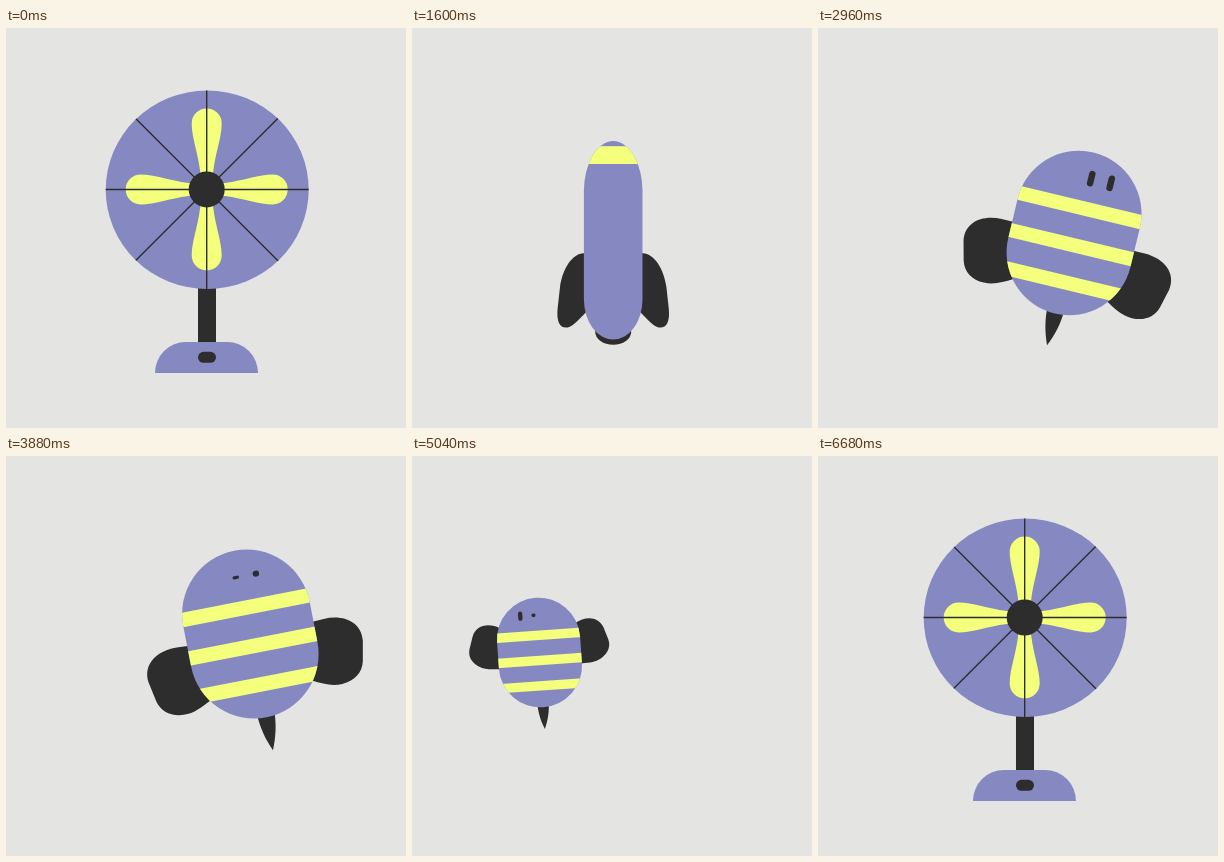
An HTML page with a canvas for the animation above (6720 ms loop, 400 by 400 pixels).

```html
<!DOCTYPE html>
<html>
<head>
<meta charset="utf-8">
<style>
html, body { margin: 0; width: 100%; height: 100%; overflow: hidden; background: #e4e4e2 }
canvas { display: block }
</style>
</head>
<body>
<canvas id="stage" width="400" height="400"></canvas>
<script>
const LOOP = 6720, FLIGHT = 2160, EXIT = 5900, RETURN = 6000, TAU = Math.PI * 2;
const PAPER = '#e4e4e2', VIOLET = '#8688c1', YELLOW = '#f4ff7c', DARK = '#2d2d2d';
const c = document.getElementById('stage').getContext('2d');

// Waypoints of the flight: time, x, y, tilt
const route = [
  [FLIGHT, 201.5, 166.5, 0], [2290, 199, 156, 2], [2560, 138, 226, -8], [2960, 256, 205, 13.5],
  [3600, 272, 175, 0], [3880, 244.5, 178, -11], [4090, 172, 184, -12], [4640, 129, 192, -3],
  [5040, 127.5, 196.5, -4], [5280, 100, 220, -8], [EXIT, 183, -92, 14]
];

const clamp = v => Math.max(0, Math.min(1, v));
const smooth = (a, b, t) => { const u = clamp((t - a) / (b - a)); return u * u * (3 - 2 * u); };
const bump = (a, b, t) => Math.sin(Math.PI * clamp((t - a) / (b - a)));

// Smooth curve through the waypoints without overshoot
function along(keys, t) {
  const last = keys.length - 1, i = Math.max(0, Math.min(last, keys.findIndex(k => k[0] > t)) - 1);
  const a = keys[i], b = keys[i + 1], d = b[0] - a[0], u = (t - a[0]) / d;
  const slope = (j, n) => j < 0 || j >= last ? 0 : (keys[j + 1][n] - keys[j][n]) / (keys[j + 1][0] - keys[j][0]);
  const tangent = (j, n) => {
    const p = slope(j - 1, n), q = slope(j, n);
    return p * q > 0 ? 2 * p * q / (p + q) : 0;
  };
  return [1, 2, 3].map(n => a[n] + (b[n] - a[n]) * u * u * (3 - 2 * u)
    + d * u * (1 - u) * (tangent(i, n) * (1 - u) - tangent(i + 1, n) * u));
}

// Fan crouches, leaps, drops as a rocket and swells into a bee
function body(t) {
  const crouch = bump(700, 1060, t), rise = smooth(900, 1330, t), squeeze = smooth(900, 1400, t);
  const drop = smooth(1370, 1600, t), swell = smooth(1600, FLIGHT, t);
  const hover = 161.8 - 6.5 * bump(0, 680, t) + 4 * crouch - 32 * rise + 82.5 * drop - 45.8 * swell;
  const [x, y, tilt] = t < FLIGHT ? [201.2, hover, 0] : along(route, t);
  return {
    x, y, tilt,
    size: 1 - .2 * smooth(2250, 2750, t) + .025 * smooth(3000, 3600, t) - .295 * smooth(3860, 4120, t),
    w: 101.5 + 3 * crouch - 72.2 * squeeze + 49.2 * swell,
    h: 99.2 - 2 * crouch + 24 * rise - 24 * drop + 4.3 * swell,
    cap: 99.2 - 49 * squeeze + 28.3 * swell
  };
}

const wing = new Path2D('M-30 4.5H-92C-118 5-136 20-132 42L-126 66C-122 80-110 87-95 87C-82 87-72 81-60 74L-30 56Z');
const sting = new Path2D('M-11 30C-11 55-6 70 0 84.5C6 70 11 55 11 30Z');
const blade = new Path2D('M-5 0L-6.5-18C-9-38-15-52-15-66A15 15 0 0 1 15-66C15-52 9-38 6.5-18L5 0Z');
const foot = new Path2D('M-51.5 0A31 31 0 0 1-20.5-31H20.5A31 31 0 0 1 51.5 0Z');

function fill(color, path) {
  c.fillStyle = color;
  path ? c.fill(path) : c.fill();
}
function group(draw) { c.save(); draw(); c.restore(); }
function pill(x, y, w, h) {
  c.beginPath();
  c.roundRect(x - w / 2, y - h / 2, w, h, Math.min(w, h) / 2);
  fill(DARK);
}

function drawStand(t, y) {
  const k = 1 - smooth(1340, 1480, t);
  if (!k) return;
  c.fillStyle = DARK;
  c.fillRect(201 - 9 * k, y, 18 * k, 345 - 31 * k - y);
  group(() => {
    c.translate(200.5, 345);
    c.scale(k, k);
    fill(VIOLET, foot);
    pill(.5, -15.7, 18, 11);
  });
}

function drawRotor(t) {
  const k = 1 - smooth(1040, 1320, t);
  if (!k) return;
  c.translate(-.5, -.3);
  c.scale(k, k);
  group(() => {
    c.rotate(Math.PI * 5 * (t / 1300) ** 2);
    for (let i = 0; i < 4; i++) {
      fill(YELLOW, blade);
      c.rotate(TAU / 4);
    }
  });
  c.beginPath();
  for (let i = 0; i < 8; i++) {
    c.moveTo(0, 0);
    c.lineTo(110 * Math.cos(i * TAU / 8), 110 * Math.sin(i * TAU / 8));
  }
  c.strokeStyle = DARK;
  c.lineWidth = 1.4;
  c.stroke();
  c.beginPath();
  c.arc(0, 0, 18, 0, TAU);
  fill(DARK);
}

function drawWings(t) {
  const grow = smooth(1380, 1590, t), fold = 1 - smooth(1600, 2130, t);
  if (!grow) return;
  const flap = t < FLIGHT ? 0 : .28 * (1 - Math.cos(TAU * (t - FLIGHT) / 820));
  for (const side of [1, -1]) group(() => {
    c.scale(side * grow, grow);
    c.translate(14, 16);
    c.rotate(flap);
    c.translate(-14, -16);
    c.transform(1 - .6 * fold, 0, -.2 * fold, 1 - .1 * fold, 8 * fold, 9 * fold);
    fill(DARK, wing);
  });
}

function drawTail(t, nub) {
  const out = smooth(1640, 2100, t);
  if (nub) {
    c.beginPath();
    c.ellipse(0, 91.5, 18 * nub, 13 * nub, 0, 0, TAU);
    fill(DARK);
  }
  if (out) group(() => {
    c.translate(0, 60);
    c.scale(1, out);
    fill(DARK, sting);
  });
}

function drawStripes(t) {
  const lift = 60 * (1 - smooth(1400, 1600, t)) + 148 * (1 - smooth(1600, 2130, t));
  c.fillStyle = YELLOW;
  for (let i = 0; i < 3; i++) c.fillRect(-110, -41.5 + 47.7 * i - lift, 220, 17.8);
}

function drawEyes(t) {
  if (t < 1900) return;
  const look = 19 * Math.sin(TAU * (t - 2250) / 3800);
  for (const side of [-1, 1]) {
    const y = -71 - 55 * (1 - smooth(1900, 2260, t + 15 + side * 15));
    const blink = (t - 3871 + side * 33 + 622 + LOOP * 1244) % 1244 - 622;
    pill(look + side * 12.5, y, 8, Math.max(4, 20 * Math.min(1, Math.abs(blink) / 120)));
  }
}

function drawScene(t) {
  const { x, y, tilt, size, w, h, cap } = body(t);
  const nub = smooth(1400, 1580, t) * (1 - smooth(1640, 1860, t));
  const top = { x: w, y: cap }, bottom = { x: w, y: cap * (1 - .2 * nub) };
  drawStand(t, y);
  c.translate(x, y);
  c.rotate(tilt * TAU / 360);
  c.scale(size, size);
  drawWings(t);
  drawTail(t, nub);
  c.beginPath();
  c.roundRect(-w, -h, 2 * w, 2 * h, [top, top, bottom, bottom]);
  fill(VIOLET);
  c.clip();
  drawStripes(t);
  drawEyes(t);
  drawRotor(t);
}

// Slide in from the left, run a little too far, fall back
function slide(t) {
  const u = clamp((t - RETURN) / 600), back = clamp((t - 6600) / 120);
  return 11 - 316 * (1 - u) ** 3 - 11 * back * back;
}

function frame() {
  const t = performance.now() % LOOP;
  c.fillStyle = PAPER;
  c.fillRect(0, 0, 400, 400);
  group(() => {
    if (t < EXIT) drawScene(t);
    else if (t >= RETURN) {
      c.translate(slide(t), 0);
      drawScene(0);
    }
  });
  requestAnimationFrame(frame);
}
frame();
</script>
</body>
</html>
```
